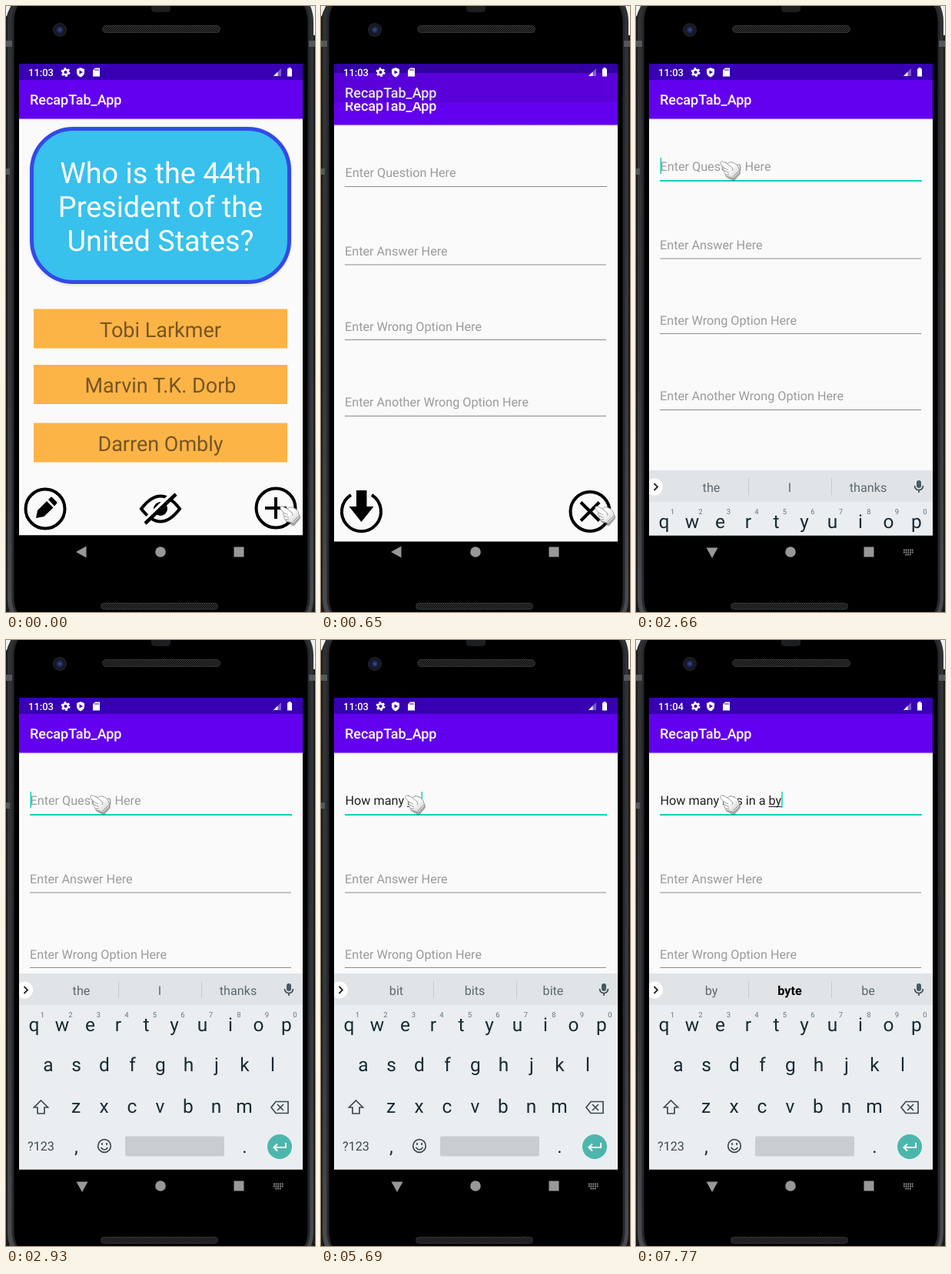
Animation, 402 px wide and 787 px high, one loop 8000 ms. Source, as an HTML page:

```html
<!DOCTYPE html>
<html lang="en">
<head>
<meta charset="utf-8">
<title>Flash card app</title>
<style>
html, body { margin: 0; width: 100%; height: 100%; overflow: hidden; background: #000; }
svg { display: block; width: 402px; height: 787px; font-family: Roboto, sans-serif; }
text { white-space: pre; text-rendering: geometricPrecision; }
.mid { text-anchor: middle; }
.title { font-size: 18px; font-weight: 500; fill: #fff; }
.question { font-size: 37.8px; fill: #fff; }
.option { font-size: 27px; fill: #765623; }
.field { font-size: 16.2px; fill: #9b9b9b; }
.key { font-size: 24.5px; fill: #182b33; }
.digit { font-size: 9.5px; fill: #66757c; }
.word { font-size: 16.2px; fill: #5c696f; }
.icon { fill: none; stroke: #000; stroke-width: 4; }
.tool { fill: none; stroke: #3d4a50; stroke-width: 1.7; }
</style>
</head>
<body>
<svg viewBox="0 0 402 787">
  <defs>
    <linearGradient id="side" x2="0" y2="1">
      <stop offset="0" stop-color="#2e3032"/><stop offset=".6" stop-color="#35373a"/><stop offset="1" stop-color="#4b4d50"/>
    </linearGradient>
    <linearGradient id="shade" x2="0" y2="1">
      <stop offset="0" stop-color="#dcdce0"/><stop offset="1" stop-color="#fafafa"/>
    </linearGradient>
    <linearGradient id="glove" x2="1" y2="1">
      <stop offset=".45" stop-color="#fff"/><stop offset="1" stop-color="#c4c4c4"/>
    </linearGradient>
    <radialGradient id="lens">
      <stop offset="0" stop-color="#42559c"/><stop offset=".3" stop-color="#222d5c"/><stop offset=".65" stop-color="#12141f"/><stop offset="1" stop-color="#242528"/>
    </radialGradient>
    <pattern id="mesh" width="3" height="3" patternUnits="userSpaceOnUse">
      <rect width="3" height="3" fill="#141414"/><path d="M0 3L3 0" stroke="#3a3a3a"/>
    </pattern>
    <clipPath id="screen"><rect x="17" y="75" width="369" height="612.500"/></clipPath>
    <clipPath id="reveal"><rect id="revealBox" x="17" y="75" width="369" height="640"/></clipPath>
    <g id="bars">
      <rect x="17" y="75" width="369" height="612.500" fill="#fafafa"/>
      <rect x="17" y="146" width="369" height="3" fill="url(#shade)"/>
      <rect x="17" y="75" width="369" height="21" fill="#3700b3"/>
      <rect x="17" y="96" width="369" height="50.500" fill="#6200ee"/>
      <text class="title" x="31" y="128">RecapTab_App</text>
    </g>
  </defs>

  <!-- phone body -->
  <rect width="402" height="787" fill="#1a1a1a"/>
  <path d="M0 0H8Q3 5 1.500 12L0 14ZM402 0H395Q399 12 399.500 38H402Z" fill="#eef0f2"/>
  <rect x="2" y="-30" width="398" height="850" rx="50" fill="url(#side)"/>
  <rect x="9" y="-24" width="385" height="836" rx="44" stroke="#25272a" stroke-width="3"/>
  <path d="M0 45H8V53H0ZM394 45H402V53H394ZM0 211H5V219H0Z" fill="#55585b"/>
  <path d="M189 0H214V4Q214 8 208 8H195Q189 8 189 4Z" fill="#1d1e20"/>
  <circle cx="70" cy="31" r="9" fill="url(#lens)"/>
  <rect x="125.5" y="25.5" width="153" height="9" rx="4.5" fill="url(#mesh)" stroke="#333"/>
  <rect x="123.5" y="775.5" width="152" height="8" rx="4" fill="url(#mesh)" stroke="#333"/>

  <!-- card screen -->
  <g clip-path="url(#screen)">
    <g id="cardScreen">
      <use href="#bars"/>
      <rect x="29" y="155.500" width="344" height="209" rx="60" fill="#efefef"/>
      <rect x="33.500" y="159.500" width="335" height="199" rx="54" fill="#37c1ec" stroke="#3449e8" stroke-width="5"/>
      <g class="question mid">
        <text x="201" y="230">Who is the 44th</text><text x="201" y="274">President of the</text><text x="201" y="318">United States?</text>
      </g>
      <path d="M36 393.500H366V444.500H36ZM36 466H366V517H36ZM36 541.500H366V592.500H36Z" fill="#fdb447"/>
      <g class="option mid">
        <text x="201" y="430">Tobi Larkmer</text><text x="201" y="502">Marvin T.K. Dorb</text><text x="201" y="577.500">Darren Ombly</text>
      </g>
      <circle class="icon" cx="51" cy="653" r="25.500"/>
      <path d="M39 665L41 655L53 643L61.500 651.500L49.500 663ZM55 641L58 638Q59 637 60 638L66 644Q67 645 66 646L63 649.500Z"/>
      <path class="icon" d="M176 653Q201 620 226 653Q201 686 176 653Z"/>
      <circle cx="201" cy="653" r="9"/><circle cx="204" cy="650" r="2.500" fill="#fafafa"/>
      <path d="M178 670L217 632" stroke="#fafafa" stroke-width="4"/><path d="M181 672L221 634" stroke="#000" stroke-width="4.500"/>
      <circle class="icon" cx="351" cy="652" r="25.500"/><path class="icon" d="M337 652H365M351 638V666"/>
    </g>
    <rect id="dim" x="17" y="75" width="369" height="612.500" opacity="0"/>
  </g>

  <!-- entry screen -->
  <g clip-path="url(#reveal)">
    <g id="entryScreen">
      <use href="#bars"/>
      <g id="hints" class="field"></g>
      <path d="M31 328H371M31 425.500H371M31 524.500H371" stroke="#8c8c8c"/>
      <path id="focusLine"/>
      <path id="underline" stroke="#222"/>
      <text id="typed" class="field" x="31.500" y="214" style="fill:#212121"></text>
      <rect id="caret" y="197" width="1.600" height="21" fill="#12d6c3"/>
      <path class="icon" d="M39 627A25.500 25.500 0 1 0 66 627"/>
      <path d="M46 621H59.500V642H68.500L52.500 662L36.500 642H46Z"/>
      <circle class="icon" cx="350" cy="648.500" r="25.500"/><path class="icon" d="M338 636.500L362 660.500M362 636.500L338 660.500"/>
    </g>
  </g>

  <!-- keyboard -->
  <g clip-path="url(#screen)">
    <g id="keyboard">
      <rect x="17" y="433" width="369" height="255" fill="#eaeef1"/>
      <rect x="17" y="433" width="369" height="41" fill="#e0e4e7"/>
      <circle cx="24" cy="454.500" r="11" fill="#fff"/>
      <path d="M23.500 450L28 454.500L23.500 459" fill="none" stroke="#222" stroke-width="1.800"/>
      <path d="M146.500 443V465M254.500 443V465" stroke="#c5cacd"/>
      <g id="words" class="word mid"></g>
      <rect x="365" y="446" width="6" height="10" rx="3" fill="#455a64"/>
      <path class="tool" d="M362.500 453Q363 458.500 368 458.500T373.500 453M368 458V462"/>
      <g id="keys" class="mid"></g>
      <path class="tool" d="M45.500 598L54.500 607H50V615H41V607H36.500Z"/>
      <path class="tool" d="M345 607L351 599.500H367V614.500H351ZM353 603L361 611M361 603L353 611"/>
      <text x="28" y="663" font-size="16.200" fill="#3d4a50">?123</text>
      <circle class="tool" cx="128" cy="657" r="8.300"/>
      <path class="tool" d="M123.500 659Q128 665 132.500 659M125 653V656M131 653V656"/>
      <rect x="155" y="644.500" width="129" height="26" rx="2" fill="#c9cdd0"/>
      <circle cx="356" cy="658" r="16" fill="#4db6ac"/>
      <path d="M364 653V659H349M353 654.500L348.500 659L353 663.500" fill="none" stroke="#fff" stroke-width="2"/>
    </g>
  </g>

  <!-- status and navigation -->
  <g fill="#fff">
    <text id="clock" x="29" y="90.500" font-size="13" font-weight="500"></text>
    <circle cx="77.500" cy="86" r="3.300" fill="none" stroke="#fff" stroke-width="2.400"/>
    <circle cx="77.500" cy="86" r="5" fill="none" stroke="#fff" stroke-width="2" stroke-dasharray="2.620"/>
    <path d="M97 80L102 82V86Q102 90 97 92.500Q92 90 92 86V82Z"/><path d="M95.500 83.500L100 86L95.500 88.500Z" fill="#3700b3"/>
    <path d="M116 80.500H122V91.500H113V83.500Z"/><path d="M116 82V84M118 82V84M120 82V84" stroke="#3700b3"/>
    <path d="M348 91L358 81V91Z" opacity=".35"/><path d="M348 91L353.500 85.500V91Z"/>
    <path d="M366 81.500H367.500V80H370.500V81.500H372V91.500H366Z"/>
  </g>
  <g fill="#989898">
    <path id="back"/>
    <circle cx="201" cy="709" r="6.800"/><rect x="296.500" y="702.500" width="13" height="13"/>
    <path id="imeIcon" d="M348 706.500H361M348 709.500H361M350.500 712.500H358.500" stroke="#989898" stroke-width="1.800" stroke-dasharray="1.700 1"/>
  </g>

  <g id="hand">
    <path d="M6 12L26 12Q28 16 26 18L19 26Q17 27 15 25L8 21Z" fill="#444" opacity=".45"/>
    <path d="M1 4Q0 0 4 1L10 4Q12 1 16 2Q23 4 24.500 9L26 15L18 23L12 21Q8 21 7.500 18Q5 16 6 13Q4 12 5 9Z" fill="url(#glove)" stroke="#8a8a8a" stroke-width=".8"/>
    <path d="M5 9L11 12M6 13L12 15.500M7.500 18L12 18M10 4L16 9Q18 11 16 13" fill="none" stroke="#8f8f8f" stroke-width=".9"/>
    <path d="M17 21L24.500 13.500" stroke="#8a8a8a"/>
  </g>
</svg>
<script>
const LOOP = 8000;
const FIELD_X = 31.5;
const $ = id => document.getElementById(id);
const label = (x, y, text, cls = '') => `<text x="${x}" y="${y}" class="${cls}">${text}</text>`;
const show = (id, on) => { $(id).style.display = on ? '' : 'none'; };
const shift = (id, x, y) => $(id).setAttribute('transform', `translate(${x} ${y})`);
const current = (steps, t) => steps.findLast(step => step[0] <= t);

$('hints').innerHTML = label(FIELD_X, 214, 'Enter Question Here', 'first')
  + label(31, 315.5, 'Enter Answer Here') + label(31, 413.5, 'Enter Wrong Option Here')
  + label(31, 512, 'Enter Another Wrong Option Here');
const firstHint = document.querySelector('.first');

const keyRow = (letters, x, y) => [...letters].map((c, i) => label(x + i * 36.5, y, c, 'key')).join('');
$('keys').innerHTML = keyRow('qwertyuiop', 36.5, 508) + keyRow('asdfghjkl', 55, 560)
  + keyRow('zxcvbnm', 91, 614) + label(91.5, 666, ',', 'key') + label(310.5, 666, '.', 'key')
  + [...'1234567890'].map((c, i) => label(47.5 + i * 36.5, 490, c, 'digit')).join('');
$('words').innerHTML = [98, 200, 302].map(x => label(x, 460.5, '')).join('');
const wordSlots = [...$('words').children];

const pen = document.createElement('canvas').getContext('2d');
pen.font = '16.2px Roboto, sans-serif';
pen.textRendering = 'geometricPrecision';
const widthOf = text => pen.measureText(text).width;

// time, entry offset, reveal top, card offset, dim
const opening = [[0, 0, 800, 0, 0], [530, 26, 600, -1, .02], [650, 8, 125, -9, .09], [770, 2, 75, -13, .1], [890, 0, 75, -13, 0]];
// time, hand x, hand y
const handPath = [[0, 356, 649], [1200, 280, 530], [1350, 175, 365], [1470, 132, 302],
  [1620, 125, 268], [1770, 113, 218], [1920, 109, 201]];
const keyboardSlide = [[0, 254], [2660, 170], [2780, 45], [2930, 0]];
const caretBlink = [[0, false], [2510, true], [3050, false], [3480, true], [6640, false], [6920, true]];
// time, finished text, word in progress, suggestions
const typing = [
  [0, '', '', 'the', 'I', 'thanks'],
  [3480, '', 'H', 'H', 'Hi', 'Hey'],
  [3630, '', 'Ho', 'Ho', 'How', 'Hope'],
  [3760, '', 'How', 'How', 'How are', 'However'],
  [3910, 'How ', '', 'are', 'is', 'do'],
  [4190, 'How ', 'm', 'm', 'many', 'much'],
  [4310, 'How ', 'ma', 'ma', 'many', 'may'],
  [4620, 'How ', 'many', 'many', 'many bits', 'many people'],
  [4740, 'How many ', '', 'people', 'of', 'times'],
  [5170, 'How many ', 'b', 'b', 'bits', 'be'],
  [5420, 'How many ', 'bi', 'bi', 'bits', 'big'],
  [5690, 'How many ', 'bit', 'bit', 'bits', 'bite'],
  [5810, 'How many ', 'bits', 'bits', 'bits of', 'bits in'],
  [6120, 'How many bits ', '', 'in', 'and', 'of'],
  [6920, 'How many bits ', 'i', 'i', 'in', 'is'],
  [7040, 'How many bits ', 'in', 'in', 'in a', 'in the'],
  [7200, 'How many bits in ', '', 'a', 'the', 'my'],
  [7370, 'How many bits in a ', '', 'byte', 'bit', 'day'],
  [7490, 'How many bits in a ', 'b', 'b', 'be', 'byte'],
  [7770, 'How many bits in a ', 'by', 'by', 'byte', 'be']
];

function draw(t) {
  const [, enterY, top, leaveY, dim] = current(opening, t);
  shift('entryScreen', 0, enterY);
  shift('cardScreen', 0, leaveY);
  $('revealBox').setAttribute('y', top);
  $('dim').setAttribute('opacity', dim);

  const [, handX, handY] = current(handPath, t);
  shift('hand', handX, handY);

  const focused = t >= 2510, keyboardUp = t >= 2660;
  shift('keyboard', 0, current(keyboardSlide, t)[1]);
  $('focusLine').setAttribute('d', focused ? 'M31 227H372' : 'M31 226.5H372');
  $('focusLine').setAttribute('stroke', focused ? '#12cfc0' : '#8c8c8c');
  $('focusLine').setAttribute('stroke-width', focused ? 2 : 1);
  $('back').setAttribute('d', keyboardUp ? 'M91.5 703.500H106.500L99 717Z' : 'M104.500 701.500V716.500L91 709Z');
  show('keyboard', keyboardUp);
  show('imeIcon', keyboardUp);

  const [, done, word, ...suggestions] = current(typing, t);
  const text = done + word, wordX = FIELD_X + widthOf(done), endX = FIELD_X + widthOf(text);
  $('typed').textContent = text;
  firstHint.style.display = text ? 'none' : '';
  $('underline').setAttribute('d', word ? `M${wordX} 216.500H${endX}` : '');
  $('caret').setAttribute('x', endX);
  show('caret', current(caretBlink, t)[1]);
  suggestions.forEach((s, i) => {
    const strong = s === 'byte' && word === 'by';
    wordSlots[i].textContent = s;
    wordSlots[i].style.cssText = strong ? 'font-weight:700;fill:#000' : s.length > 10 ? 'font-size:15px' : '';
  });
  $('clock').textContent = t < 7200 ? '11:03' : '11:04';
}

const start = performance.now();
function tick() {
  draw((performance.now() - start) % LOOP);
  requestAnimationFrame(tick);
}
tick();
</script>
</body>
</html>
```
